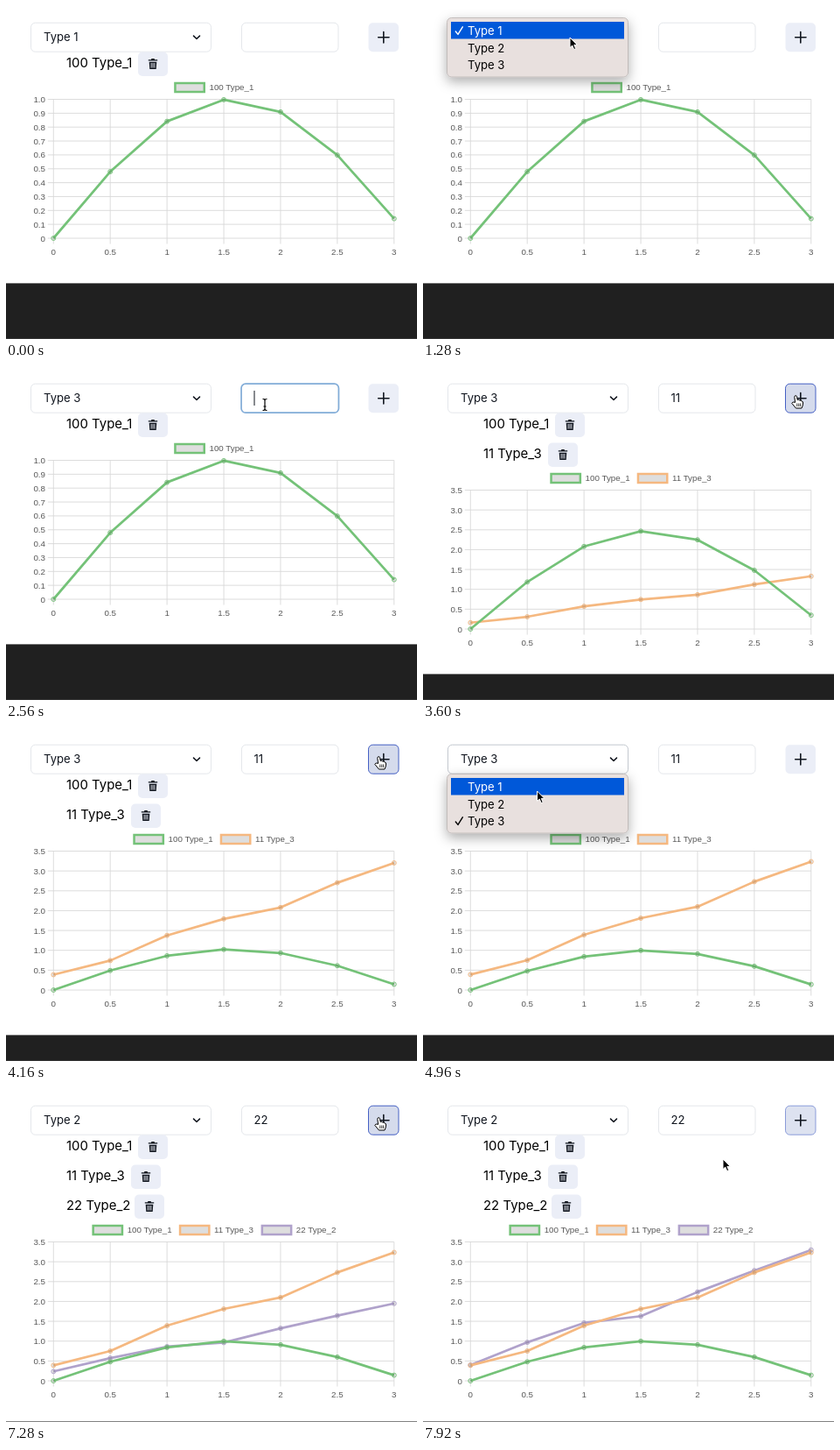
Recreate the animation shown at these times as an HTML page. Size 470x380 px, loop 8 s.

```html
<!DOCTYPE html>
<html lang="en">
<head>
<meta charset="utf-8">
<title>Chart builder</title>
<style>
html, body { margin: 0; width: 470px; height: 380px; overflow: hidden; background: #fff; }
svg { display: block; font-family: Inter, "Open Sans", sans-serif; }
.chart { font: 9.8px "Liberation Sans", Arial, sans-serif; fill: #585858; }
</style>
</head>
<body>
<svg id="stage" width="470" height="380" viewBox="0 0 470 380"></svg>
<script>
const LOOP = 8000, STEP = 80;
const ADD = [3476, 7080];               // moments at which a series is added
const INK = '#11161f';

const series = [
  { name: '100 Type_1', color: '#74c278', width: 52.8, bin: 151,
    data: [0, .5, 1, 1.5, 2, 2.5, 3].map(Math.sin) },
  { name: '11 Type_3', color: '#f5b880', width: 47.2, bin: 143,
    data: [.39, .75, 1.39, 1.81, 2.1, 2.73, 3.235] },
  { name: '22 Type_2', color: '#b0a2cb', width: 47.2, bin: 147,
    data: [.4, .97, 1.46, 1.63, 2.24, 2.78, 3.3] }
];

// pointer path: time, x, y
const path = [
  [80, 240, 110], [600, 168, 38], [1040, 168, 38], [1200, 168, 36], [1290, 168, 36],
  [1440, 150, 67], [1720, 150, 67], [2300, 296, 43], [2980, 296, 43], [3260, 428, 35],
  [4220, 428, 35], [4620, 140, 40], [4760, 140, 40], [4960, 130.5, 72], [5040, 131, 80],
  [5200, 133, 88], [5480, 133, 88], [5860, 314, 33], [6760, 314, 33], [7000, 428, 35],
  [7720, 428, 35], [7920, 343, 80]
];
const popups = [
  { open: 1040, pick: 1600, top: 13, checked: 0 },
  { open: 4720, pick: 5360, top: 52, checked: 2 }
];

const clamp = v => Math.max(0, Math.min(1, v));
const lerp = (a, b, p) => a + (b - a) * p;
const within = (t, a, b) => t >= a && t < b;
const easeOut = p => 1 - (1 - clamp(p)) ** 4;
const fade = (t, a, b, d = 200) => Math.min(clamp((t - a) / d), clamp(1 - (t - b) / d));

const rect = (x, y, w, h, attrs) => `<rect x="${x}" y="${y}" width="${w}" height="${h}" ${attrs}/>`;
const text = (x, y, s, size, fill = INK) =>
  `<text x="${x}" y="${y}" font-size="${size}" fill="${fill}">${s}</text>`;
const stroke = (d, color, w, extra = '') =>
  `<path d="${d}" fill="none" stroke="${color}" stroke-width="${w}" ${extra}/>`;
const round = 'stroke-linecap="round" stroke-linejoin="round"';

function pointer(t) {
  const i = path.findIndex(k => k[0] > t);
  if (i < 0) return path[path.length - 1].slice(1);
  if (!i) return path[0].slice(1);
  const [a, b] = [path[i - 1], path[i]];
  const p = (t - a[0]) / (b[0] - a[0]), e = p * p * (3 - 2 * p);
  return [lerp(a[1], b[1], e), lerp(a[2], b[2], e)];
}

function drawCursor(t) {
  if (t < 80 || within(t, 2700, 2980) || within(t, 6480, 6780)) return '';
  const [x, y] = pointer(t);
  const menu = popups.some(m => within(t, m.open, m.pick));
  const over = (a, b) => !menu && x > a && x < b && y > 19 && y < 53;
  let shape;
  if (over(269, 380)) {
    const beam = 'M-2.5-6.5Q0-6.5 0-5Q0-6.5 2.5-6.5M0-5V5M-2.5 6.5Q0 6.5 0 5Q0 6.5 2.5 6.5M-1.5 2H1.5';
    shape = stroke(beam, '#fff', 2.4) + stroke(beam, '#000', 1.2);
  } else if (over(414, 449)) {
    shape = `<path d="M-2.4 5.4L-3.2-.6Q-3-2.6-1.6-2.4Q-.6-2.2-.4-.8L.2 2.6Q2.2 1.6 2.8 3.2Q4.8 2.4 5.2 4.2Q6.6 4 6.6 6Q6.6 9 5 12H-1.6Q-4 9-6.2 6.4Q-5.4 4-2.4 5.4Z"
      fill="#fff" stroke="#000" stroke-width="1" stroke-linejoin="round"/>${stroke('M-.2 6.5V10M1.8 6.5V10M3.7 6.5V10', '#000', .8)}`;
  } else {
    shape = `<path d="M0 0V11.6L2.7 9.1L4.7 13.6L6.7 12.7L4.8 8.4H8.4Z" fill="#000" stroke="#fff" stroke-width="1"/>`;
  }
  return `<g transform="translate(${x} ${y})">${shape}</g>`;
}

function drawForm(t) {
  const type = t < 1640 ? 1 : t < 5400 ? 3 : 2;
  const value = t < 2720 ? '' : t < 2800 ? '1' : t < 6480 ? '11' : t < 6640 ? '2' : '22';
  const caret = 283.5 + (t < 6480 ? 5.9 : 8.2) * value.length;
  const box = (x, w, attrs) => rect(x, 19.2, w, 33, 'rx="5" ' + attrs);
  const field = color => `fill="#fff" stroke="${color}"`;
  const ring = Math.max(fade(t, 2470, 3400, 150), fade(t, 5900, 7040, 150));
  const hover = Math.max(fade(t, 3200, 4250), fade(t, 6960, 7840));
  const selected = within(t, 6240, 6480);

  let out = box(28.5, 206, field(within(t, 4600, 5560) ? '#c3c8cf' : '#e4e7eb'))
    + text(43, 40.4, 'Type ' + type, 13.1)
    + stroke('M214.5 34.1L218 37.5L221.5 34.1', INK, 1.5, round)
    + box(269.5, 110.5, field('#e4e7eb'))
    + box(269, 111.5, `fill="none" stroke="#3a7fc6" stroke-width="1.7" opacity="${ring}"`);
  if (selected) out += rect(283, 27, 13, 17, 'fill="#b3d7ff"');
  out += text(283.5, 40.4, value, 13.1);
  if ((within(t, 2430, 3400) || within(t, 5900, 7040)) && !selected)
    out += rect(caret, 27, 1, 17, `fill="${INK}"`);
  return out
    + box(414.5, 34.5, 'fill="#ebeef7"')
    + box(414.5, 34.5, `fill="#d5dbec" stroke="#4560c4" opacity="${hover}"`)
    + stroke('M425.7 35.7H438M431.8 29.5V41.9', INK, 1.6, 'stroke-linecap="round"');
}

function drawRow(s, i) {
  const y = 34 * i;
  return text(69, 70.3 + y, s.name, 14.95, '#000')
    + rect(s.bin, 52.5 + y, 34, 27.5, 'rx="5" fill="#ebeef7"')
    + `<g transform="translate(${s.bin + 17} ${66 + y})">`
    + `<path d="M-5.2-4.8H-2.2L-1.5-6H1.5L2.2-4.8H5.2V-3.4H-5.2ZM-4.3-2.3H4.3L3.7 6H-3.7Z" fill="${INK}"/>`
    + stroke('M-1.9-1V4.6M0-1V4.6M1.9-1V4.6', '#ebeef7', .9) + '</g>';
}

function drawChart(t, shown) {
  const n = shown.length, left = 54.3, right = 443.8, h = 158.5;
  const base = 265 + 34 * (n - 1), top = base - h, legendY = top - 13.5;
  const max = n > 1 ? 3.5 : 1, ticks = n > 1 ? 7 : 10;
  const px = i => left + (right - left) * i / 6;
  let grid = '', labels = '', legend = '', plots = '';

  for (let i = 0; i <= ticks; i++) {
    const y = base - h * i / ticks;
    grid += `M${left - 6.5} ${y}H${right}`;
    labels += `<text x="45" y="${y + 3.5}" text-anchor="end">${i ? (max * i / ticks).toFixed(1) : 0}</text>`;
  }
  for (let i = 0; i <= 6; i++) {
    grid += `M${px(i)} ${top}V${base + 6.5}`;
    labels += `<text x="${px(i)}" y="${base + 19}" text-anchor="middle">${i / 2}</text>`;
  }

  const total = shown.reduce((sum, s) => sum + s.width + 38.3, 8.3 * (n - 1));
  let x = 239 - total / 2;
  shown.forEach((s, k) => {
    legend += rect(x, legendY - 5, 33.3, 10, `fill="#dedede" stroke="${s.color}" stroke-width="2.5"`)
      + `<text x="${x + 39}" y="${legendY + 3.2}">${s.name}</text>`;
    x += s.width + 46.6;

    // new lines grow from the axis, the first one shrinks to the new scale
    const scale = k ? easeOut((t - ADD[k - 1]) / 1000)
      : n > 1 ? lerp(3.5, 1, easeOut((t - ADD[0]) / 1000)) : 1;
    const pts = s.data.map((v, i) => [px(i), base - h * v * scale / max]);
    plots = stroke('M' + pts.join('L'), s.color, 2.7, 'stroke-linejoin="round"')
      + pts.map(p => `<circle cx="${p[0]}" cy="${p[1]}" r="2.5" fill="#0000001a" stroke="${s.color}" stroke-width=".9"/>`).join('')
      + plots;
  });
  return `<g class="chart">${stroke(grid, '#d8d8d8', .9)}${labels}${legend}${plots}</g>`
    + rect(0, base + 51.4, 470, 120, 'fill="#202020"')
    + rect(0, 379, 470, 1, 'fill="#404040" opacity=".65"');
}

function drawPopup(t, m) {
  if (!within(t, m.open, m.pick + 120)) return '';
  const y = pointer(t)[1], flash = within(t, m.pick, m.pick + 40);
  const hot = flash ? -1 : Math.floor((y - m.top - 5) / 19.5);
  let out = rect(27.5, m.top + .5, 207, 67.5, 'rx="5" fill="#e8e0de" stroke="#b9b3b1" stroke-width=".8" filter="url(#shadow)"');
  for (let i = 0; i < 3; i++) {
    const top = m.top + 5 + 19.5 * i, on = i === hot, color = on ? '#fff' : '#000';
    if (on) out += rect(32, top, 198, 19.5, 'fill="#0058d9"');
    out += text(51, top + 15.2, 'Type ' + (i + 1), 13.1, color);
    if (i === m.checked)
      out += stroke(`M37.3 ${top + 11}L40 ${top + 14.4}L45.3 ${top + 5.8}`, color, 1.4, round);
  }
  return `<g opacity="${1 - clamp((t - m.pick - 40) / 80)}">${out}</g>`;
}

const stage = document.getElementById('stage');
const defs = `<defs><filter id="shadow" x="-20%" y="-50%" width="140%" height="220%">
  <feDropShadow dx="0" dy="5" stdDeviation="7" flood-opacity=".32"/></filter></defs>`;

function render() {
  const t = Math.floor(performance.now() % LOOP / STEP) * STEP;
  const shown = series.slice(0, 1 + ADD.filter(a => t >= a).length);
  stage.innerHTML = defs + drawChart(t, shown) + drawForm(t) + shown.map(drawRow).join('')
    + popups.map(m => drawPopup(t, m)).join('') + drawCursor(t);
  requestAnimationFrame(render);
}
render();
</script>
</body>
</html>
```
